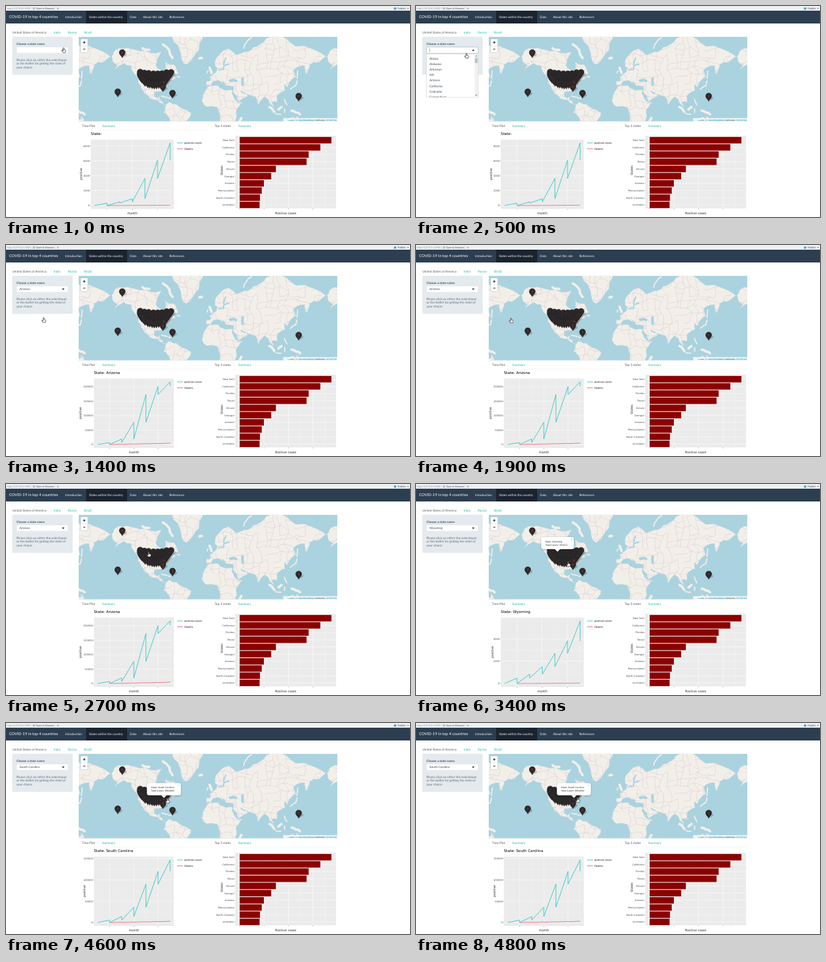
Recreate the animation shown at these times as an HTML page. Size 600 by 314 pixels, loop 4900 ms.

```html
<!DOCTYPE html>
<html lang="en">
<head>
<meta charset="utf-8">
<title>State dashboard</title>
<style>
html, body { margin: 0; width: 100%; height: 100%; overflow: hidden; background: #fff; }
svg { display: block; width: 100vw; height: 100vh; }
text { white-space: pre; text-rendering: geometricPrecision; }
.lato { font-family: Lato, sans-serif; font-size: 4.65px; }
.plot { font-family: "DejaVu Sans", sans-serif; font-size: 3.65px; }
.map { font-family: "Liberation Sans", sans-serif; font-size: 3.6px; }
</style>
</head>
<body>
<svg id="stage" viewBox="0 0 600 314"></svg>
<script>
const LOOP = 4900, STEP = 100;
const TEAL = '#18bc9c', INK = '#2c3e50', LAND = '#f2efe9', OCEAN = '#aad3df';

// ---------- helpers ----------
const range = (n, f) => Array.from({ length: n }, (_, i) => f(i));
const mix = (a, b, u) => a + (b - a) * u;
const attrs = o => Object.entries(o).map(([k, v]) => ` ${k}="${v}"`).join('');
const rect = (x, y, w, h, fill, o = {}) =>
  `<rect x="${x}" y="${y}" width="${w}" height="${h}" fill="${fill}"${attrs(o)}/>`;
const path = (d, o = {}) => `<path d="${d}"${attrs(o)}/>`;
const line = (d, stroke, width, o = {}) =>
  path(d, { fill: 'none', stroke, 'stroke-width': width, 'stroke-linejoin': 'round', ...o });
const text = (x, y, s, fill, cls = 'lato', o = {}) =>
  `<text x="${x}" y="${y}" fill="${fill}" class="${cls}"${attrs(o)}>${s}</text>`;
const size = px => ({ style: `font-size:${px}px` });
const middle = { 'text-anchor': 'middle' }, end = { 'text-anchor': 'end' };

let seed = 7;
const spread = amount => {
  seed = (seed * 16807) % 2147483647;
  return (seed / 2147483647 * 2 - 1) * amount;
};

// ---------- web mercator map ----------
const WORLD = 320, RADIUS = WORLD / (2 * Math.PI);
const project = (lon, lat) => [
  306 + lon * WORLD / 360,
  154 - RADIUS * Math.log(Math.tan(Math.PI / 4 + lat * Math.PI / 360))
];
// midpoint displacement turns a few points into a ragged coast
function rough([x0, y0], [x1, y1], depth) {
  if (!depth) return `L${x1.toFixed(1)} ${y1.toFixed(1)}`;
  const bend = spread(.13);
  const mid = [(x0 + x1) / 2 - (y1 - y0) * bend, (y0 + y1) / 2 + (x1 - x0) * bend];
  return rough([x0, y0], mid, depth - 1) + rough(mid, [x1, y1], depth - 1);
}
const trace = points => `M${points[0]}` + points.slice(1).map((p, i) => rough(points[i], p, 2)).join('');
const parse = coords => coords.split(' ').map(p => project(...p.split(',').map(Number)));
const shore = coords => { const p = parse(coords); return trace([...p, p[0]]) + 'Z'; };
const ridge = (width, color, ...strips) =>
  line(strips.map(s => trace(parse(s))).join(''), color, width, { 'stroke-linecap': 'round' });

const northAmerica = shore('-168,66 -156,71 -128,70 -96,68 -85,69 -94,59 -82,53 -79,52 -78,62 -70,60 -64,60 -56,52 -66,50 -61,46 -70,43 -76,36 -81,31 -80,26 -84,30 -97,28 -97,21 -91,18.5 -87,21 -88,16 -83,14 -81,9 -77,8 -86,11 -94,16 -105,20 -113,31 -111,24 -118,33 -124,41 -124,48 -135,59 -147,61 -163,55 -158,59 -165,62');
const southAmerica = shore('-77,8 -72,12 -60,9 -50,1 -35,-6 -39,-15 -48,-27 -70,-27 -70,-18 -81,-5 -78,3');
const africa = shore('-6,36 10,37 20,31 33,31 43,12 51,12 40,-3 40,-15 35,-26 14,-26 13,-9 9,4 -8,4.5 -17,14 -10,31');
const eurasia = shore('-9,37 -9,43 -2,43.5 -4,48 8,54 10,57 5,59 5,62 14,68 27,71 41,67 60,69 80,73 104,77 140,72 190,66 179,62 163,60 157,51 155,59 136,55 140,48 128,40 126,35 121,39 122,30 108,21 109,12 100,13 104,1.5 98,9 94,17 88,21 80,13 77,8 72,21 57,26 60,22 45,13 35,29 36,36.5 27,37 23,37 14,45 18,40 9,44 3,43 -2,37');
const greenland = shore('-73,78 -54,70 -48,61 -43,60 -22,70 -18,80');
const australia = shore('113,-26 122,-18 136,-12 139,-17 142,-11 153,-26');
const continents = northAmerica + southAmerica + africa + eurasia + greenland + australia;

const islands = ridge(3.6, LAND, '-82,73 -66,65', '-116,71 -105,70', '96,4 104,-4', '111,0 116,4', '133,-2 147,-8', '46,-23 49,-14', '-1,52 -4,57', '-21,64.7 -17,65') +
  ridge(1.7, LAND, '-84,22 -75,20', '-73,19 -69,18.5', '106,-7 115,-8', '121,17 125,8', '142,46 143,54', '53,71 66,76', '131,32 140,37 142,43', '121,1 121,-5', '-8,52 -7,54', '-58,48 -54,48');
const seas = ridge(3.8, OCEAN, '30,43.5 40,43', '51,46 51,38') +
  ridge(1.9, OCEAN, '11,55 19,55.5 20,59 28,60', '19,60 23,65', '34,27 42,14', '49,29 55,26', '-91,47.5 -85,47', '-87,42 -86,45.5', '-82,45 -80,43.5');

// country borders: a jittered mesh, shown only on land
function borderMesh() {
  const cell = 10, cols = WORLD / cell + 2, rows = 14;
  const nodes = range(rows, r => range(cols, c => [146 + c * cell + spread(4.5), 44 + r * cell + spread(4.5)]));
  let d = '';
  for (let r = 1; r < rows; r++) for (let c = 1; c < cols; c++) {
    if (spread(1) < .5) d += trace([nodes[r][c - 1], nodes[r][c]]);
    if (spread(1) < .5) d += trace([nodes[r - 1][c], nodes[r][c]]);
  }
  return line(d, '#cfbbcd', .4, { 'clip-path': 'url(#landArea)' });
}
const world = path(continents, { fill: LAND, stroke: '#d9d6d8', 'stroke-width': .25 }) + borderMesh() + islands + seas;

function pin(lon, lat) {
  const [x, y] = project(lon, lat);
  return `<g transform="translate(${x.toFixed(1)} ${y.toFixed(1)})">` +
    path('M0 0L6-6.5Q8-6 6-4Z', { fill: '#000', opacity: .25 }) +
    path('M0 0C-1-3-4.6-4.6-4.6-8A4.6 4.6 0 0 1 4.6-8C4.6-4.6 1-3 0 0Z', { fill: '#2c2a2b', stroke: '#1c1a1b', 'stroke-width': .3 }) +
    path('M-1.4-8.2H1.4L0-6.4ZM-.6-9.5H.6V-8H-.6Z', { fill: '#8f2528' }) + '</g>';
}
// rows follow the narrowing outline of the contiguous states
const mainland = range(7, r => range(8, i => {
  const u = i / 7, west = -120.5 + .35 * r * r, east = -69 - 2 * r;
  return [mix(west, east, u) + spread(.6), 47 - 2.2 * r - 1.7 * Math.sin(Math.PI * u) + spread(.3)];
})).flat();
const territories = [[-82, 28], [-150, 65], [-157.5, 20.3], [-66, 18.2], [144.8, 13.4]];
const pins = [...mainland, ...territories].map(p => pin(...p)).join('');

// ---------- fixed page ----------
const chrome = rect(0, 0, 600, 7.2, '#edf1f3') +
  text(1.5, 5.4, 'http://127.0.0.1:5983', '#8b9296', 'lato', size(3.7)) +
  rect(38.2, 1, .4, 6, '#c8cdd0') + rect(40, 2.2, 3, 3.2, '#a9bcc8') +
  text(44.5, 5.4, 'Open in Browser', '#3f464b', 'lato', size(3.7)) +
  rect(72.6, 1, .4, 6, '#c8cdd0') + `<circle cx="77" cy="3.8" r="1.4" fill="#9db9c8"/>` +
  `<circle cx="577.8" cy="3.8" r="1.9" fill="#4b9ed1"/>` +
  text(581.5, 5.3, 'Publish', '#3f464b', 'lato', size(3.8)) + path('M595.8 3h2.4l-1.2 1.6z', { fill: '#555' });

const navLabels = [[88, 'Introduction'], [123.2, 'States within the country'], [184, 'Data'], [203.5, 'About this site'], [242.5, 'References']];
const navbar = rect(0, 7, 600, 19, INK) + rect(119, 7, 61, 19, '#1a242f') +
  text(4.6, 18.4, 'COVID-19 in top 4 countries', '#fff', 'lato', size(5.75)) +
  navLabels.map(([x, s]) => text(x, 18.1, s, '#fff', 'lato', size(4.6))).join('');

const countryTabs = text(9.5, 40.9, 'United States of America', '#555') +
  [[71, 'India'], [92, 'Russia'], [116, 'Brazil']].map(([x, s]) => text(x, 40.9, s, TEAL)).join('') +
  line('M5 45.2V33.5H65.5V45.2H595', '#f1f4f5', .4);

const sidebar = rect(9.3, 45.8, 89.6, 56.6, '#e4eaed', { rx: 1 }) +
  text(15.5, 57.5, 'Choose a state name:', INK, 'lato', { style: 'font-size:4.5px;font-weight:600' }) +
  rect(15.6, 61, 76.8, 9.4, '#fff', { rx: 1, stroke: '#cfd6da', 'stroke-width': .4 }) +
  ['Please click on either the selectInput', 'or the leaflet for getting the state of', 'your choice']
    .map((s, i) => text(15.5, 81.5 + i * 5.9, s, '#5d6b78')).join('');

const zoomButtons = rect(110.8, 49, 10.8, 20.4, '#fff', { rx: 1.2, stroke: '#a9b4b8', 'stroke-width': .5 }) +
  line('M111 59.2H121.4', '#ccc', .4) + line('M114.4 54.2h3.6M116.2 52.4v3.6M114.6 64.2h3.2', '#111', .9);

const link = s => `<tspan fill="#0078a8">${s}</tspan>`;
const map = '<clipPath id="mapArea">' + rect(108, 45.8, 384, 126, '#fff') + '</clipPath>' +
  `<clipPath id="landArea">${path(continents)}</clipPath><g clip-path="url(#mapArea)">` +
  rect(108, 45.8, 384, 126, OCEAN) +
  [-WORLD, 0, WORLD].map(dx => `<g transform="translate(${dx})">${world}</g>`).join('') + pins + zoomButtons +
  rect(411.5, 166.8, 80.5, 5, '#fff', { opacity: .75 }) +
  text(490.8, 170.5, `${link('Leaflet')} | © ${link('OpenStreetMap')} contributors, ${link('CC-BY-SA')}`,
    '#333', 'map', { ...end, ...size(3.2) }) + '</g>';

const plotTabs = line('M108 184.8V172.4H136.5V184.8H300M305 184.8V172.4H338V184.8H492', '#e9edef', .4) +
  text(112.8, 180, 'Time Plot', '#555') + text(143, 180, 'Summary', TEAL) +
  text(309.8, 180, 'Top 5 states', '#555') + text(345, 180, 'Summary', TEAL);

// ---------- plots ----------
const axisTitle = (x, y, s, turn = 0) =>
  text(0, 0, s, '#222', 'plot', { ...middle, ...size(4.56), transform: `translate(${x} ${y}) rotate(${turn})` });
const strokes = (items, f, color, width) => line(items.map(f).join(''), color, width);

const bars = { 'New York': 483.3, California: 466.8, Florida: 449.5, Texas: 446.4, Illinois: 400.8,
  Georgia: 393.8, Arizona: 383, Pennsylvania: 379.8, 'North Carolina': 377.2, Louisiana: 376.6 };
const barColumns = range(4, i => 347 + i * 36.3);
const barPlot = rect(340.4, 193, 149.8, 108.2, '#ebebeb') +
  strokes(barColumns, x => `M${x} 193V301.2`, '#fff', .5) +
  strokes(barColumns, x => `M${x + 18.1} 193V301.2`, '#f6f6f6', .3) +
  strokes(barColumns, x => `M${x} 301.2v1.3`, '#333', .4) +
  Object.entries(bars).map(([name, right], i) => {
    const y = 199.7 + i * 10.7;
    return line(`M340.4 ${y}H490.2`, '#fff', .5) + line(`M339.2 ${y}h1.2`, '#333', .4) +
      rect(347, y - 4.8, right - 347, 9.6, '#8b0000') + text(338.6, y + 1.3, name, '#4d4d4d', 'plot', end);
  }).join('') +
  axisTitle(415.3, 310, 'Positive cases') + axisTitle(322.3, 244.5, 'States', -90);

const CASES = '#20c5c0', DEATHS = '#f0566a';
const legend = [['positive cases', CASES, 203.8], ['Deaths', DEATHS, 212.6]].map(([s, c, y]) =>
  line(`M254 ${y}h8.8`, c, .8) + text(264.9, y + 1.3, s, '#111', 'plot')).join('');

// peaks are month-end heights; each month starts where the previous one ended
const BASE = 297, RIGHT = 249.3;
const plots = {
  '': { labelX: 113.4, unit: 2000, gap: 22.2, peaks: [3.6, 5.5, 10.2, 40.5, 67.4, 93.4], deaths: .5 },
  'Arizona': { labelX: 112.4, unit: 50000, gap: 21.5, peaks: [3, 8.4, 33.2, 74.5, 86.6, 93.4], deaths: 2 },
  'Wyoming': { labelX: 115, unit: 2000, gap: 33.3, peaks: [8.2, 14, 25.2, 45, 63.6, 93.2], deaths: .6 },
  'South Carolina': { labelX: 117.8, unit: 50000, gap: 31.8, peaks: [3.6, 9, 23, 57.2, 76.2, 93.2], deaths: 1.8 }
};
function timePlot(name) {
  const { labelX, unit, gap, peaks, deaths } = plots[name];
  const left = unit < 10000 ? 126 : 130.6, first = left + 5.3;
  const month = i => mix(first, 243.8, i / 6);
  const ticks = range(Math.floor(96 / gap) + 1, i => [i * unit, BASE - i * gap]);
  const columns = [1, 3, 5].map(month);
  const series = `M${first} ${BASE}` +
    peaks.map((h, i) => `L${month(i + 1)} ${BASE - h}V${BASE - (peaks[i - 1] || 0)}`).join('');
  const deathLine = `M${month(1)} ${BASE}` + range(5, i => {
    const y = BASE - deaths * (i + 1) / 5;
    return `L${month(i + 2)} ${y - deaths * .1}V${y + deaths * .1}`;
  }).join('');
  return text(left, 191.8, `State: ${name}`, '#000', 'plot', size(5.48)) +
    rect(left, 198.7, RIGHT - left, 103.3, '#ebebeb') +
    strokes([0, 2, 4, 6].map(month), x => `M${x} 198.7V302`, '#f6f6f6', .3) +
    strokes(ticks.slice(1), ([, y]) => `M${left} ${y + gap / 2}H${RIGHT}`, '#f6f6f6', .3) +
    strokes(ticks, ([, y]) => `M${left} ${y}H${RIGHT}`, '#fff', .5) +
    strokes(columns, x => `M${x} 198.7V302`, '#fff', .5) +
    strokes(ticks, ([, y]) => `M${left - 1.2} ${y}h1.2`, '#333', .4) +
    strokes(columns, x => `M${x} 302v1.3`, '#333', .4) +
    ticks.map(([v, y]) => text(left - 1.8, y + 1.3, v, '#4d4d4d', 'plot', end)).join('') +
    line(deathLine, DEATHS, .75) + line(series, CASES, .8) +
    axisTitle((left + RIGHT) / 2, 310, 'month') + axisTitle(labelX, 250, 'positive', -90);
}

// ---------- select box and popup ----------
const ROW = 8.15;
const options = ['Alaska', 'Alabama', 'Arkansas', 'NA', 'Arizona', 'California', 'Colorado', 'Connecticut'];
const arrow = up => path(up ? 'M83 66.8h4l-2-2.2z' : 'M83 64.8h4l-2 2.2z', { fill: '#222' });
function dropdown(cursorY) {
  const row = Math.floor((cursorY - 74.2) / ROW);
  return rect(15.6, 61, 76.8, 9.4, '#fff', { rx: 1, stroke: '#8fb3c4', 'stroke-width': .6 }) +
    line('M20.2 63.2V68.4', '#222', .4) +
    rect(15.6, 71.2, 76.8, 64.8, '#fff', { stroke: '#c3cacd', 'stroke-width': .5 }) +
    (row >= 0 ? rect(16, 74.1 + row * ROW, 70.8, ROW, '#f0f0f0') : '') +
    '<clipPath id="list">' + rect(16, 71.5, 76, 64.2, '#fff') + '</clipPath><g clip-path="url(#list)">' +
    options.map((s, i) => text(20, 79.8 + i * ROW, s, '#3c4650')).join('') + '</g>' +
    rect(87, 71.6, 5.1, 64.2, '#f1f1f1') + rect(87.4, 77.2, 4.2, 7.6, '#c1c1c1') +
    path('M88.3 75h2.4l-1.2-1.6zM88.3 132h2.4l-1.2 1.6z', { fill: '#555' });
}
function popup({ x, y, w, state, total }) {
  const left = x - w / 2;
  return `<g filter="url(#soft)">` + rect(left, y - 21.8, w, 18, '#fff', { rx: 3.4 }) +
    path(`M${x - 4} ${y - 4}h8l-4 4z`, { fill: '#fff' }) + '</g>' +
    text(left + 6, y - 14.2, `State: ${state}`, '#333', 'map') +
    text(left + 6, y - 9, `Total Cases: ${total}`, '#333', 'map') +
    line(`M${left + w - 4.2} ${y - 19.6}l1.8 1.8m0-1.8l-1.8 1.8`, '#aaa', .5);
}
const popups = [
  { from: 3200, x: 210.2, y: 100.8, w: 48.5, state: 'Wyoming', total: '354472' },
  { from: 4400, x: 234.5, y: 111.4, w: 50.5, state: 'South Carolina', total: '9954892' }
];

// ---------- timeline ----------
const OPEN = 400, PICK = 1300;
const selections = [[0, ''], [PICK, 'Arizona'], [3300, 'Wyoming'], [4500, 'South Carolina']];
const cursorKeys = [[0, 85.5, 62], [300, 85.5, 62], [800, 55.2, 85.8], [PICK, 49, 108], [1900, 141, 108.6],
  [2700, 212, 101], [3100, 211, 101.5], [3400, 226, 115.6], [4200, 239, 113.8], [LOOP, 240, 110.8]];

function cursorAt(t) {
  const i = cursorKeys.findIndex(([from]) => from > t);
  const [t0, x0, y0] = cursorKeys[i - 1], [t1, x1, y1] = cursorKeys[i];
  const u = (t - t0) / (t1 - t0), eased = u * u * (3 - 2 * u);
  return [mix(x0, x1, eased), mix(y0, y1, eased)];
}
const hand = (x, y) => path('M-.7.5Q0-.5.7.5V3L2.7 3.4Q3.5 3.7 3.3 4.8L2.7 7.2H-1L-2.7 4.8Q-3 3.9-2 4L-.7 5Z',
  { transform: `translate(${x} ${y})`, fill: '#fff', stroke: '#111', 'stroke-width': .6, 'stroke-linejoin': 'round' });

const stage = document.getElementById('stage');
stage.innerHTML = '<filter id="soft" x="-20%" y="-20%" width="140%" height="150%"><feDropShadow dx="0" dy=".7" stdDeviation="1" flood-opacity=".4"/></filter>' +
  rect(0, 0, 600, 314, '#fff') + chrome + navbar + countryTabs + sidebar + map + plotTabs + barPlot + legend +
  '<g id="plot"></g><g id="overlay"></g>';
const plotLayer = document.getElementById('plot'), overlay = document.getElementById('overlay');
let shownPlot = null, shownTime = -1;

function render(time) {
  const t = Math.floor(time % LOOP / STEP) * STEP;
  if (t === shownTime) return;
  shownTime = t;
  const name = selections.filter(([from]) => from <= t).pop()[1], [x, y] = cursorAt(t);
  const open = t >= OPEN && t < PICK, bubble = popups.filter(p => p.from <= t).pop();
  if (name !== shownPlot) plotLayer.innerHTML = timePlot(shownPlot = name);
  overlay.innerHTML = (open ? dropdown(y) : text(20, 67.4, name, '#3c4650')) + arrow(open) +
    (bubble ? popup(bubble) : '') + hand(x, y);
}

const start = performance.now();
function tick() {
  render(performance.now() - start);
  requestAnimationFrame(tick);
}
tick();
</script>
</body>
</html>
```
